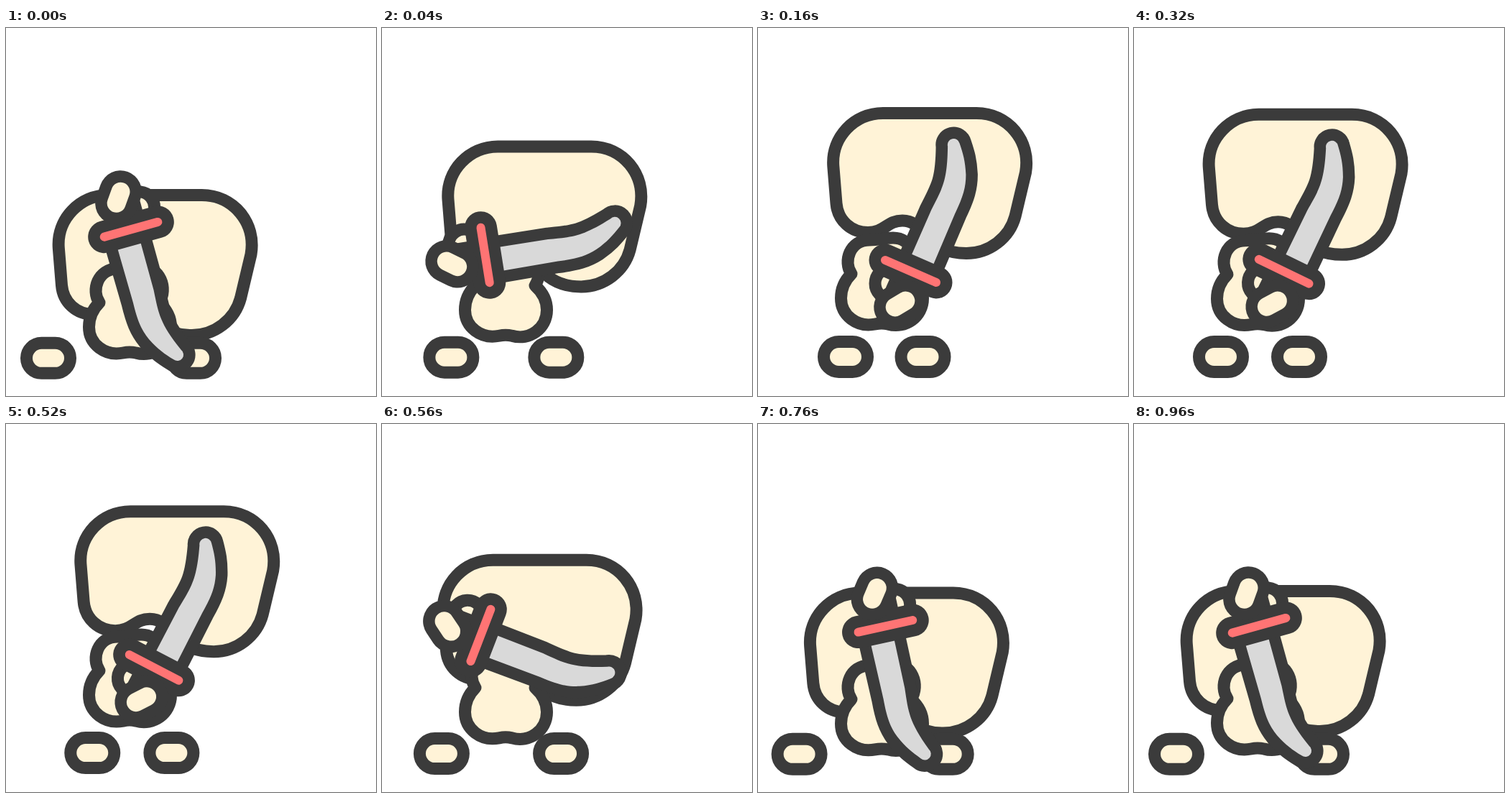
An HTML page that plays this animation: 515 px wide and 512 px high, repeating every 1000 ms.

```html
<!DOCTYPE html>
<html lang="en">
<head>
<meta charset="utf-8">
<title>Sword swing</title>
<style>
  html, body { margin: 0; height: 100%; overflow: hidden; background: #fff; }
  svg { display: block; width: 515px; height: 512px; }
  .skin { fill: #fff3d7; stroke: #3b3b3b; stroke-width: 17; stroke-linejoin: round; }
  .line { fill: none; stroke: #3b3b3b; stroke-linecap: round; }
  .blade { fill: #d9d9d9; stroke: #3b3b3b; stroke-width: 33; stroke-linejoin: round; paint-order: stroke; }
</style>
</head>
<body>
<svg viewBox="0 0 515 512">
  <path id="head" class="skin" d="M174 118.5H304C348 118.5 380 157 372.5 201L358 262C350 292 322 313.5 290 313.5C272 313.5 258 310 245 300C228 285 222 268 201 268C180 268 176 284.5 153 284.5C130 284.5 111 268 109 244L104.8 192C102 152 134 118.5 174 118.5Z"/>
  <rect id="left" class="skin" x="91.5" y="436.5" width="61" height="42" rx="21"/>
  <rect id="right" class="skin" x="199" y="436.5" width="61" height="42" rx="21"/>
  <path id="body" class="skin" d="M130 342C118 325 128 295 155 295C170 295 175 292 188 292C214 292 226 322 213 342C222 350 229.5 360 229.5 376C229.5 402 205 419 181 412Q172 410 163 412C138 417 115.5 400 115.5 376C115.5 360 122 350 130 342Z"/>
  <g id="sword">
    <circle class="skin" cx="184.8" cy="355.5" r="21.8"/>
    <path class="line" stroke-width="45" d="M212.5 338.5L195.5 377"/>
    <path class="blade" d="M211 322L241.3 253C257.3 222 263.5 212 264.1 164.5A8.4 8.4 0 0 1 280.6 160.5C285.5 175 288.5 185 289.4 204C289.4 222 285.3 235 274.3 258L242 334Z"/>
    <path class="line" stroke-width="45" d="M177 323L248 354"/>
    <path class="line" stroke-width="12" style="stroke:#ff7474" d="M177 323L248 354"/>
    <path class="line" stroke-width="59" d="M190.7 388.4L205.3 379.6"/>
    <path class="line" stroke-width="26" style="stroke:#fff3d7" d="M190.7 388.4L205.3 379.6"/>
  </g>
</svg>
<script>
const STEP = 40, STEPS = 25, HALF = 13;
const RAISED = 0.0277; // settled raised pose; 1 is lowered
// quick snap, slight overshoot, slow settle
const ease = [0, .61, .932, 1.026, 1.0285, 1.029, 1.023, 1.017, 1.0117, 1.007, 1.003, 1, 1];

const place = (id, x, y, extra = "") =>
  document.getElementById(id).setAttribute("transform", `translate(${x} ${y})${extra}`);

function pose(q) {
  place("head", -31.5 * q, 114 * q);
  place("body", 0, 40 * q);
  place("left", -63 * q, 1.8 * q);
  place("right", 31.5 * q, 1.8 * q);
  place("sword", -47.6 * q, 98 * q, ` rotate(${140.9 * q} 244.8 262)`);
}

function draw(now) {
  const i = Math.floor(now / STEP) % STEPS;
  const p = ease[i % HALF] * (1 - RAISED);
  pose(i < HALF ? 1 - p : RAISED + p);
  requestAnimationFrame(() => draw(performance.now() - start));
}
const start = performance.now();
draw(0);
</script>
</body>
</html>
```
